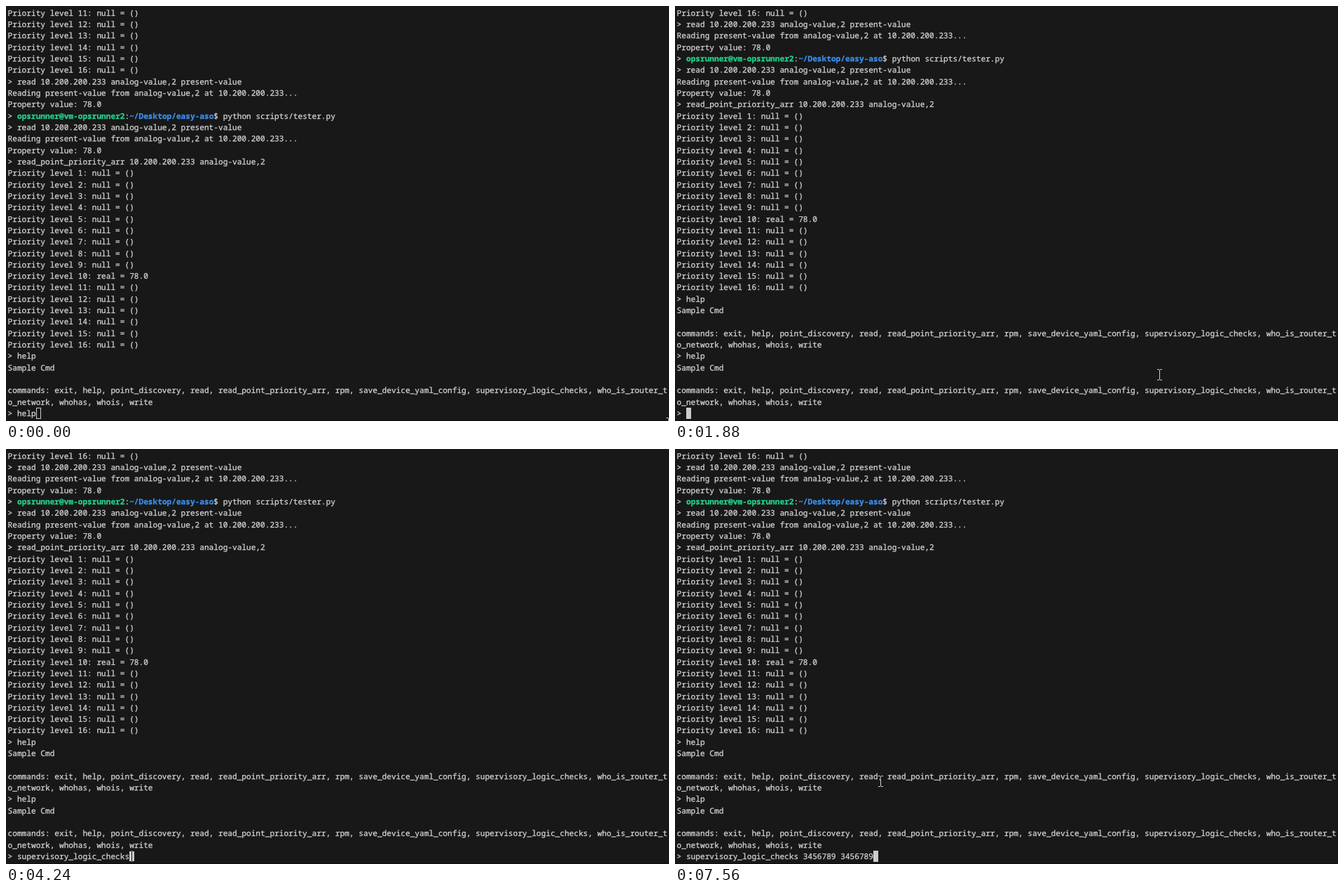
Write an HTML page that moves like this. It is 946 px wide and 592 px high and loops after 8 s.

```html
<!DOCTYPE html>
<html lang="en">
<head>
<meta charset="utf-8">
<title>Terminal session</title>
<style>
  html, body { margin: 0; width: 100%; height: 100%; overflow: hidden; background: #181818; }
  svg { display: block; }
  text {
    font: 11.14px "Noto Sans Mono", "DejaVu Sans Mono", monospace;
    fill: #d2d2d2;
    stroke: #d2d2d2;
    stroke-width: .3px;
    white-space: pre;
    text-rendering: geometricPrecision;
    font-variant-ligatures: none;
  }
  .user { fill: #23d18b; stroke: #23d18b; font-weight: bold; }
  .path { fill: #3b8eea; stroke: #3b8eea; font-weight: bold; }
  #pointer { fill: none; stroke: #e7e7e7; mix-blend-mode: difference; shape-rendering: crispEdges; }
</style>
</head>
<body>
<svg width="946" height="592" viewBox="0 0 946 592">
  <rect width="946" height="592" fill="#181818"/>
  <rect y="591" width="946" height="1" fill="#0e0e0e"/>
  <rect id="selection" fill="#264f78"/>
  <g id="rows"></g>
  <rect id="caret" stroke="#ccc"/>
  <path id="pointer" d="M-3 -7.5H0M1 -7.5H4M.5 -7V7M-3 7.5H0M1 7.5H4"/>
</svg>
<script>
const LOOP = 8000, STEP = 40, ROWS = 36;
const LEFT = 2.6, TOP = 1.8, CHAR = 6.684, LINE = 16.32;
const $ = id => document.getElementById(id);
const colX = col => LEFT + col * CHAR;
const rowY = row => Math.round(TOP + row * LINE);

const levels = (from, to) => Array.from({ length: to - from + 1 }, (_, i) => {
  const n = from + i;
  return `Priority level ${n}: ${n === 10 ? 'real = 78.0' : 'null = ()'}`;
});
const readValue = [
  '> read 10.200.200.233 analog-value,2 present-value',
  'Reading present-value from analog-value,2 at 10.200.200.233...',
  'Property value: 78.0'
];
const helpText = [
  'Sample Cmd',
  '',
  'commands: exit, help, point_discovery, read, read_point_priority_arr, rpm, ' +
    'save_device_yaml_config, supervisory_logic_checks, who_is_router_t',
  'o_network, whohas, whois, write'
];
const shellPrompt = '> <tspan class="user">opsrunner@vm-opsrunner2</tspan>:' +
  '<tspan class="path">~/Desktop/easy-aso</tspan>$ python scripts/tester.py';
const escapePrompt = line => line.replace(/^>/, '&gt;');
const history = [
  ...levels(11, 16), ...readValue, shellPrompt, ...readValue,
  '> read_point_priority_arr 10.200.200.233 analog-value,2',
  ...levels(1, 16), '> help', ...helpText, '> help', ...helpText
].map(escapePrompt);

const ENTER = 1000, FOCUS = 480, SELECT = [2600, 3280];
const keys = [
  [4240, 'supervisory_logic_checks'], [4600, ' '],
  [5200, '3'], [5400, '4'], [5520, '5'], [5680, '6'], [5840, '7'], [6000, '8'], [6120, '9'],
  [6320, ' '],
  [6680, '3'], [6840, '4'], [7000, '5'], [7160, '6'], [7280, '7'], [7400, '8'], [7520, '9']
];
// Pointer stops: time, x, y
const stops = [
  [0, 945, 595], [60, 945, 595], [480, 693, 490], [1440, 693, 490], [2280, 690, 557],
  [2360, 690, 554], [3240, 690, 554], [3480, 362, 566], [3600, 362, 566],
  [3960, 179, 581], [4360, 179, 581], [4640, 293, 474], [LOOP, 293, 474]
];

const rows = Array.from({ length: ROWS }, (_, i) => {
  const text = document.createElementNS('http://www.w3.org/2000/svg', 'text');
  text.setAttribute('x', LEFT);
  text.setAttribute('y', rowY(i) + 12);
  return $('rows').appendChild(text);
});

function setAttrs(el, attrs) {
  for (const name in attrs) el.setAttribute(name, attrs[name]);
}

function pointerAt(t) {
  const i = stops.findIndex(stop => stop[0] > t);
  const [t0, x0, y0] = stops[i - 1], [t1, x1, y1] = stops[i];
  const p = (t - t0) / (t1 - t0), ease = p * p * (3 - 2 * p);
  return [x0 + (x1 - x0) * ease, y0 + (y1 - y0) * ease].map(Math.round);
}

setAttrs($('selection'), { x: colX(100), y: rowY(33), width: 24 * CHAR, height: 17 });

let shown = '';
function render(t) {
  const entered = t >= ENTER, focused = t >= FOCUS;
  const scroll = entered ? 5 : 0;
  const typed = keys.filter(key => key[0] <= t).map(key => key[1]).join('');
  const input = '> ' + (entered ? typed : 'help');

  const state = scroll + input;
  if (state !== shown) {
    const lines = history.slice(scroll, scroll + ROWS - 1).concat(escapePrompt(input));
    rows.forEach((row, i) => row.innerHTML = lines[i]);
    shown = state;
  }

  setAttrs($('caret'), {
    x: Math.round(colX(input.length)) + .5, y: rowY(ROWS - 1) + .5,
    width: 6, height: 15, fill: focused ? '#ccc' : 'none'
  });
  $('selection').style.display = t >= SELECT[0] && t < SELECT[1] ? '' : 'none';
  $('pointer').setAttribute('transform', `translate(${pointerAt(t)})`);
}

const start = performance.now();
function frame() {
  const t = (performance.now() - start) % LOOP;
  render(Math.floor(t / STEP) * STEP);
  requestAnimationFrame(frame);
}
frame();
</script>
</body>
</html>
```
